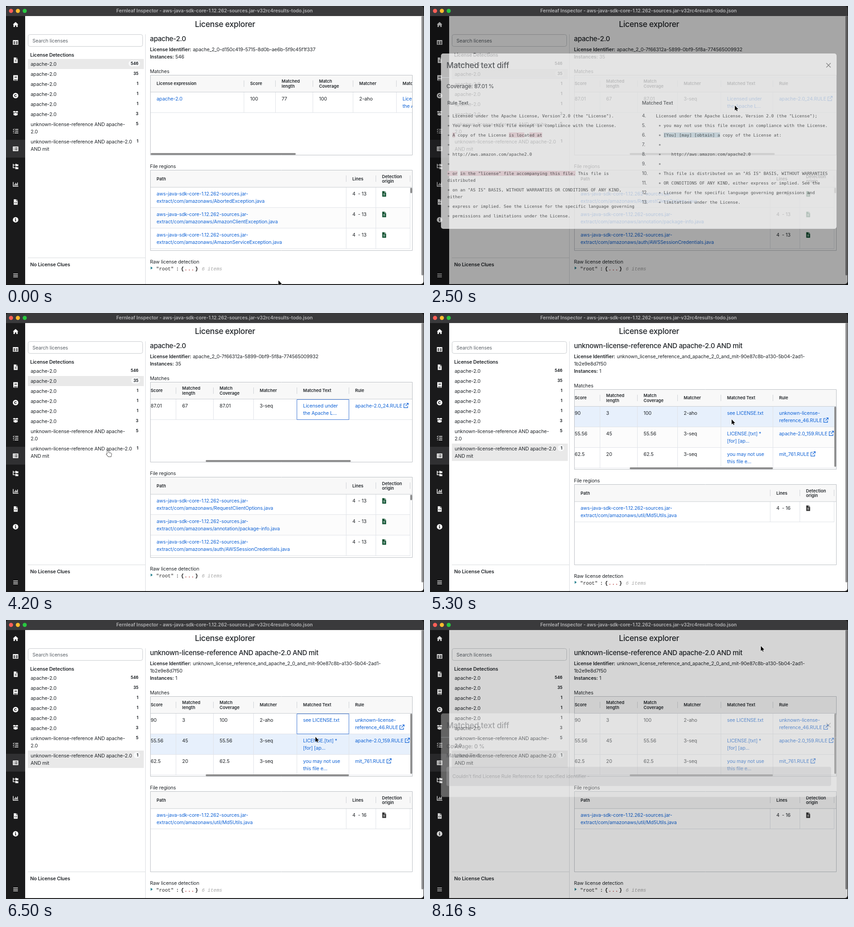
These frames come from a looping animation (916x611 px, 8320 ms). An HTML page with a canvas:

```html
<!DOCTYPE html>
<html lang="en">
<head>
<meta charset="utf-8">
<title>License explorer</title>
<style>
html, body { margin: 0; width: 100%; height: 100%; overflow: hidden; background: #1a1a1b; }
canvas { display: block; }
</style>
</head>
<body>
<canvas id="stage" width="916" height="611"></canvas>
<script>
const c = document.getElementById('stage').getContext('2d');
const LOOP = 8320, LINK = '#1264d6', INK = '#212529';
const SANS = 'Inter, sans-serif', CODE = '"DejaVu Sans Mono", monospace', MONO = '"Liberation Mono", monospace';

// ---------- data ----------
const detections = [
  ['apache-2.0', 546], ['apache-2.0', 35], ['apache-2.0', 1], ['apache-2.0', 1], ['apache-2.0', 1],
  ['apache-2.0', 3], ['unknown-license-reference AND apache-\n2.0', 5],
  ['unknown-license-reference AND apache-2.0\nAND mit', 1]
];
const jar = 'aws-java-sdk-core-1.12.262-sources.jar-\nextract/com/amazonaws/';
const apacheText = 'Licensed under\nthe Apache L...';
const licenses = [
  { item: 0, name: 'apache-2.0', id: 'apache_2_0-d150c419-5715-8d0b-ae6b-5f9c45f1f337', count: 546, dy: 0, end: 13,
    rows: [['apache-2.0', '100', '77', '100', '2-aho', apacheText, 'apache-2.0_7.RULE']],
    files: ['AbortedException', 'AmazonClientException', 'AmazonServiceException'] },
  { item: 1, name: 'apache-2.0', id: 'apache_2_0-7f66312a-5899-0bf9-5f8a-774565009932', count: 35, dy: 0, end: 13,
    rows: [['apache-2.0', '87.01', '67', '87.01', '3-seq', apacheText, 'apache-2.0_24.RULE']],
    files: ['RequestClientOptions', 'annotation/package-info', 'auth/AWSSessionCredentials'] },
  { item: 7, name: 'unknown-license-reference AND apache-2.0 AND mit',
    id: 'unknown_license_reference_and_apache_2_0_and_mit-90e87c8b-a130-5b04-2ad1-', id2: '1b2e9e8d7f50',
    count: 1, dy: 16, end: 16,
    rows: [
      ['unknown-license-reference', '90', '3', '100', '2-aho', 'see LICENSE.txt', 'unknown-license-\nreference_46.RULE'],
      ['apache-2.0', '55.56', '45', '55.56', '3-seq', 'LICENSE.[txt] *\n[for] [ap...', 'apache-2.0_159.RULE'],
      ['mit', '62.5', '20', '62.5', '3-seq', 'you may not use\nthis file e...', 'mit_761.RULE']],
    files: ['util/Md5Utils'] }
];
const columns = [['License expression', 330, 521], ['Score', 535, 590], ['Matched\nlength', 604, 672],
  ['Match\nCoverage', 686, 760], ['Matcher', 774, 855], ['Matched Text', 869, 969], ['Rule', 983, 1150]];

// Text between ~ marks is highlighted.
const modals = [
  { open: 2500, close: 3700, height: 384, coverage: '87.01',
    left: ['* Licensed under the Apache License, Version 2.0 (the "License").',
      '* You may not use this file except in compliance with the License.',
      '* ~A~ copy of the License ~is loc~at~ed at~', '*', '* http://aws.amazon.com/apache2.0', '*',
      '~* or~ ~in the "license" file accompanying this file.~ This file is\ndistributed',
      '* on an "AS IS" BASIS, WITHOUT WARRANTIES OR CONDITIONS OF ANY KIND,\neither',
      '* express or implied. See the License for the specific language governing',
      '* permissions and limitations under the License.'],
    right: [' Licensed under the Apache License, Version 2.0 (the "License");',
      '  * you may not use this file except in compliance with the License.',
      '  * ~[You] [may] [obtain] a~ copy of the License at:', '  *',
      '  *    http://aws.amazon.com/apache2.0', '  *',
      '  * This file is distributed on an "AS IS" BASIS, WITHOUT WARRANTIES',
      '  * OR CONDITIONS OF ANY KIND, either express or implied. See the',
      '  * License for the specific language governing permissions and',
      '  * limitations under the License.'] },
  { open: 5400, close: 5900, height: 165, coverage: '100', left: ['see LICENSE.txt'], right: ['see LICENSE.txt'] },
  { open: 6700, close: 8160, height: 375, coverage: '55.56',
    left: ['LICENSE.', '* Licensed under the Apache License, Version 2.0 (the "License").',
      '* You may not use this file except in compliance with the License.',
      '* A copy of the License is located at', '*', '* http://aws.amazon.com/apache2.0', '*',
      '* or in the "license" file accompanying this file. ~This file is~'],
    right: ['LICENSE.~[txt]~', '  * ~[for] [applicable] [license] [terms] [and] [NOTICE]~',
      '  * ~[for] [applicable] [notices]~', '  *',
      '  * Licensed under the Apache License, Version 2.0 (the "License").',
      '  * You may not use this file except in compliance with the License.',
      '  * A copy of the License is located at', '  *', '  * http://aws.amazon.com/apache2.0', '  *',
      '  * or in the "license" file accompanying this file.'] }
];
const cursorKeys = [[300, 597, 601], [800, 265, 150], [1100, 265, 150], [1500, 561, 260], [1600, 561, 260],
  [1900, 578, 243], [2300, 668, 218], [2900, 668, 218], [3500, 805, 73], [3700, 805, 73], [4200, 223, 301],
  [4600, 223, 301], [5300, 661, 233], [5500, 661, 233], [5800, 690, 185], [5900, 690, 185], [6400, 678, 256],
  [7100, 678, 256], [8000, 725, 57]];
const scrollKeys = [[1500, 0], [1600, 100], [1700, 168], [1800, 206], [1900, 218]];

// ---------- icons, 12 units square ----------
const page = 'M2 0H7V3.5H10.5V12H2ZM7.8 0L10.5 2.7H7.8Z';
const disc = 'M6 0A6 6 0 1 0 6 12A6 6 0 1 0 6 0Z';
const fileIcon = page + 'M4 5.5H8.5V6.5H4ZM4 8H8.5V9H4Z';
const icons = [
  'M6 0L12 5.5H10.5V11H7.5V7.5H4.5V11H1.5V5.5H0Z',
  'M0 1H12V11H0ZM1.5 4H5.2V6.2H1.5ZM6.8 4H10.5V6.2H6.8ZM1.5 7.5H5.2V9.5H1.5ZM6.8 7.5H10.5V9.5H6.8Z',
  fileIcon,
  'M1 0H11V9.5H10V11H11V12H2.5Q1 12 1 10.5ZM3.5 3H9V4H3.5ZM3.5 5H9V6H3.5ZM2.7 9.5H9V11H2.7Z',
  disc + 'M8.5 4.5A3 3 0 1 0 8.5 7.5L7.4 6.7A1.6 1.6 0 1 1 7.4 5.3Z',
  'M0 3L2 .5 6 1.5 10 .5 12 3 8 4.5 6 2.5 4 4.5ZM1.5 5L4 5.8 6 4 8 5.8 10.5 5V9.5L6 11 1.5 9.5Z',
  'M0 2.2L.7 1.5 1.5 2.3 3 .5 3.7 1.2 1.5 3.8ZM0 6.2L.7 5.5 1.5 6.3 3 4.5 3.7 5.2 1.5 7.8ZM5 1.5H12V3H5ZM5 5.3H12V6.8H5ZM4 9.2H12V10.7H4ZM.8 9.2H2.3V10.7H.8Z',
  'M0 1H12V11H0ZM1.7 3H3.2V4.2H1.7ZM4.5 3H10.3V4.2H4.5ZM1.7 5.4H3.2V6.6H1.7ZM4.5 5.4H10.3V6.6H4.5ZM1.7 7.8H3.2V9H1.7ZM4.5 7.8H10.3V9H4.5Z',
  'M0 0H1.5V2H5V3.3H1.5V8H5V9.3H0ZM5.5 0H8L8.7 1H12V5H5.5ZM5.5 6.5H8L8.7 7.5H12V11.5H5.5Z',
  'M0 1H1.4V9.6H12V11H0ZM3 6H4.4V8.6H3ZM5.2 3H6.6V8.6H5.2ZM7.4 4.5H8.8V8.6H7.4ZM9.6 2H11V8.6H9.6Z',
  page + 'M5.5 5.5L3.2 7.5 5.5 9.5V8.2L4.7 7.5 5.5 6.8ZM7 5.5L9.3 7.5 7 9.5V8.2L7.8 7.5 7 6.8Z',
  disc + 'M5 2.6H6.8V4.3H5ZM4.6 5.2H6.8V8.3H7.5V9.4H4.6V8.3H5.3V6.3H4.6Z',
  'M1 2H11V3.3H1ZM1 5.4H11V6.7H1ZM1 8.8H11V10.1H1Z'
].map(d => new Path2D(d));
const filePath = new Path2D(fileIcon);
const linkPath = new Path2D('M5 2H.7V10.3H9V6.5M6.5 .7H10.3V4.5M10.3 .7L4.5 6.5');
const arrow = new Path2D('M0 0V11L2.6 8.6 4.3 12.2 5.9 11.5 4.3 8H7.7Z');
const hand = new Path2D('M3 0Q4.5 0 4.5 1.5V5L10 6Q11.5 6.5 11.3 8L10 13.5H4.5L0 8.5Q0 7 1.8 7.6L2 8V1.5Q2 0 3 0Z');

// ---------- helpers ----------
function at(keys, t) {
  const i = keys.findIndex(k => k[0] > t);
  if (i < 0) return keys.at(-1).slice(1);
  if (!i) return keys[0].slice(1);
  const a = keys[i - 1], b = keys[i], u = (t - a[0]) / (b[0] - a[0]), e = u * u * (3 - 2 * u);
  return a.slice(1).map((v, j) => v + (b[j + 1] - v) * e);
}
function rect(x, y, w, h, fill, r = 0) {
  c.fillStyle = fill;
  c.beginPath(); c.roundRect(x, y, w, h, r); c.fill();
}
function frame(x, y, w, h, color, r = 0) {
  c.strokeStyle = color; c.lineWidth = 1;
  c.beginPath(); c.roundRect(x + .5, y + .5, w - 1, h - 1, r); c.stroke();
}
// y is the middle of the first line
function text(s, x, y, { size = 10.67, weight = 400, color = INK, font = SANS, align = 'left', lead = 16, track = -.011 } = {}) {
  c.font = `${weight} ${size}px ${font}`;
  c.letterSpacing = (font === SANS ? track * size : 0) + 'px';
  c.fillStyle = color; c.textAlign = align;
  s.split('\n').forEach((line, i) => c.fillText(line, x, y + size * .36 + i * lead));
}
function icon(path, x, y, color) {
  c.save(); c.translate(x, y); c.fillStyle = color; c.fill(path, 'evenodd'); c.restore();
}
function clip(x, y, w, h, draw) {
  c.save(); c.beginPath(); c.rect(x, y, w, h); c.clip(); draw(); c.restore();
}
function header(s, x, y) {
  const two = s.includes('\n');
  text(s, x, two ? y - 5 : y, { size: 9.4, weight: 600, lead: 10.5, track: 0 });
}

// ---------- parts ----------
function chrome() {
  rect(0, 0, 916, 611, '#1a1a1b');
  rect(0, 0, 915, 22, '#3a3a3c', [6, 6, 0, 0]);
  ['#ff5f57', '#febc2e', '#28c840'].forEach((k, i) => rect(6.5 + 15 * i, 6.3, 9, 9, k, 4.5));
  text('Fernleaf Inspector - aws-java-sdk-core-1.12.262-sources.jar-v32rc4results-todo.json', 457, 10.5,
    { size: 10.4, weight: 600, color: '#b4b4b6', align: 'center', track: 0 });
  rect(42, 22, 873, 587, '#fff', [0, 0, 6, 0]);
  rect(910.5, 22, 4, 568, '#858587', 2);
  rect(0, 293, 42, 39, '#303032');
  icons.forEach((p, i) => icon(p, 15, (i === 12 ? 590 : 41 + 38.83 * i) - 6, '#fff'));
}
function sidebar(lic) {
  text('License explorer', 480, 40, { size: 17.3, weight: 500, align: 'center', track: -.018 });
  frame(48, 62, 252, 27, '#c8cbce', 4);
  text('Search licenses', 58, 76, { color: '#5c6268' });
  text('License Detections', 53, 107, { weight: 600 });
  let y = 127;
  detections.forEach(([name, n], i) => {
    const h = name.includes('\n') ? 38 : 22;
    if (i === lic.item) {
      rect(48, y - 11, 254, h, '#e9e9e9');
      const w = 9 + 5.5 * String(n).length;
      rect(294 - w, y - 7.5, w, 13, '#f8f9fa', 6.5);
    }
    text(name, 54, y);
    text(String(n), 290, y - 1, { size: 8.7, weight: 700, align: 'right' });
    y += h;
  });
  rect(305, 62, 1, 547, '#d9dcdf');
  rect(48, 551, 257, 1, '#d9dcdf');
  text('No License Clues', 53, 566, { weight: 600 });
}
function matches(lic, scroll, hover, focus) {
  text('Matches', 315.5, 143);
  rect(316, 152, 575, 36, '#f8f8f8');
  clip(317, 152, 573, 174, () => {
    c.save(); c.translate(-scroll, 0);
    columns.forEach(([label, x, edge]) => {
      header(label, x, 170);
      rect(edge, 163, 1, 14, '#cfd2d6');
    });
    lic.rows.forEach((row, r) => {
      const y = 189 + 45 * r;
      rect(316, y, 1040, 44, r === hover ? '#e7f0fc' : r % 2 ? '#fcfcfc' : '#fff');
      rect(316, y + 44, 1040, 1, '#e0e3e8');
      columns.forEach(([, x, edge], i) => {
        const linked = i === 0 || i > 4;
        text(row[i], x, y + 14, { color: linked ? LINK : INK });
        rect(edge, y, 1, 44, '#e0e3e8');
        if (i !== 6) return;
        const lines = row[i].split('\n');
        c.save();
        c.translate(x + c.measureText(lines.at(-1)).width + 3, y + 8 + 16 * (lines.length - 1));
        c.strokeStyle = LINK; c.lineWidth = 1.2; c.stroke(linkPath);
        c.restore();
      });
    });
    if (focus) frame(855, 189, 115, 45, '#3f77d4');
    c.restore();
    const tall = lic.rows.length > 1;
    rect(317 + scroll * .553, 322, tall ? 314 : 318, 4, '#8e8e8e', 2);
    if (tall) rect(886, 189, 4, 132, '#8e8e8e', 2);
  });
  rect(316, 188, 575, 1, '#c9cdd2');
  frame(316, 151, 575, 176, '#bcc0c5');
}
function regions(lic) {
  text('File regions', 315.5, 351);
  rect(316, 360, 575, 37, '#f8f8f8');
  [['Path', 330, 745], ['Lines', 759, 810], ['Detection\norigin', 824, 885]].forEach(([label, x, edge]) => {
    header(label, x, 378.5);
    rect(edge, 371, 1, 14, '#cfd2d6');
  });
  clip(316, 397, 575, 138, () => lic.files.forEach((file, r) => {
    const y = 397 + 45 * r;
    if (r % 2) rect(317, y, 569, 44, '#fcfcfc');
    rect(316, y + 44, 570, 1, '#e0e3e8');
    [745, 810, 885].forEach(x => rect(x, y, 1, 44, '#e0e3e8'));
    text(jar + file + '.java', 330, y + 14, { color: LINK });
    text('4', 759, y + 14);
    text('- ' + lic.end, 771.5, y + 14);
    icon(filePath, 822.5, y + 8.5, lic.dy ? '#333' : '#0d5130');
  }));
  if (!lic.dy) rect(886, 398, 4, 12, '#8e8e8e', 2);
  rect(316, 396.5, 575, 1, '#c9cdd2');
  frame(316, 359, 575, 177, '#bcc0c5');
}
function raw() {
  const put = (s, x, color, weight = 400) => text(s, x, 575.5, { font: MONO, color, weight });
  text('Raw license detection', 315.5, 560);
  icon(new Path2D('M0 0L4.5 3.2 0 6.5Z'), 317, 570.5, '#2a8290');
  put('"root"', 329, '#222');
  put(':', 372.5, '#222', 700);
  put('{', 383.5, '#111', 700);
  [391, 398.5, 406].forEach(x => put('.', x, '#a22', 700));
  put('}', 414.5, '#111', 700);
  put('6 items', 429, '#a5a5a5', 'italic 400');
}
function details(lic, scroll, hover, focus) {
  text(lic.name, 315.5, 72, { size: 14.9, weight: 500, track: -.02 });
  text('License Identifier:', 315.5, 95, { weight: 600 });
  text(lic.id, 409.5, 95);
  if (lic.id2) text(lic.id2, 315.5, 111);
  c.save(); c.translate(0, lic.dy);
  text('Instances:', 315.5, 111, { weight: 600 });
  text(String(lic.count), 371, 111);
  matches(lic, scroll, hover, focus);
  regions(lic);
  raw();
  c.restore();
}
function codeLine(line, x, y, mark) {
  const unit = 5.617;
  let n = 0, row = 0, on = false;
  for (const piece of line.split(/(~|\n)/)) {
    if (piece === '~') on = !on;
    else if (piece === '\n') { n = 0; row++; }
    else {
      const px = x + n * unit, py = y + 15 * row;
      if (on) rect(px, py - 5.5, piece.length * unit, 11, mark);
      // the asterisk operator sits at mid height
      text(piece.replaceAll('*', '\u2217'), px, py, { size: 9.33, font: CODE, color: '#16181a' });
      n += piece.length;
    }
  }
  return y + 21 + 15 * row;
}
function modal(m, t, p) {
  const reset = t >= m.close, h = reset ? 183 : m.height;
  rect(0, 22, 915, 588, `rgba(0,0,0,${.5 * p})`);
  c.save();
  c.globalAlpha = p;
  c.translate(0, 314.5 - h / 2 - (p < 1 ? 18.5 : 0));
  rect(24, 0, 867, h, '#fff', 5);
  text('Matched text diff', 36, 26, { size: 17.3, weight: 500 });
  rect(24, 52, 867, 1, '#dee2e6');
  c.strokeStyle = '#555'; c.lineWidth = 1.2;
  c.stroke(new Path2D('M868.5 21L878 30.5M878 21L868.5 30.5'));
  text(`Coverage: ${reset ? 0 : m.coverage} %`, 36, 72, { size: 12, weight: 500 });
  if (reset) {
    text('Matched Text:', 36, 92, { size: 11.5, weight: 500 });
    rect(36, 117, 843, 42, '#b6b7b9', 4);
    text("Couldn't find License Rule Reference for specified identifier -", 49, 138, { color: '#55585c' });
  } else {
    text('Rule Text', 38, 108.5, { weight: 500 });
    text('Matched Text', 464.5, 108.5, { weight: 500 });
    let y = 136.5;
    for (const line of m.left) y = codeLine(line, 38, y, '#d3bbc1');
    m.right.forEach((line, i) => {
      text(`${i + 4}.`, 464.5, 136.5 + 21 * i, { size: 10 });
      codeLine(line, 489.5, 136.5 + 21 * i, '#b4c6cf');
    });
  }
  c.restore();
}
function pointer(x, y, isHand) {
  c.save();
  c.translate(isHand ? x - 3 : x, y);
  c.lineJoin = 'round';
  c.strokeStyle = isHand ? '#111' : '#fff';
  c.fillStyle = isHand ? '#fff' : '#000';
  c.lineWidth = 1.3;
  const shape = isHand ? hand : arrow;
  c.stroke(shape); c.fill(shape);
  c.restore();
}

// ---------- timeline ----------
const opacity = (m, t) => t < m.open ? 0
  : t < m.close ? Math.min(1, .7 + (t - m.open) / 300)
  : Math.max(0, .33 - (t - m.close) / 300);

function draw(t) {
  const lic = licenses[t < 1100 ? 0 : t < 4600 ? 1 : 2];
  const [x, y] = at(cursorKeys, t), [scroll] = at(scrollKeys, t);
  const shown = modals.find(m => opacity(m, t) > 0);
  const inGrid = !shown && x > 316 && x < 891 && y < 326 + lic.dy;
  const hover = inGrid ? Math.floor((y - 189 - lic.dy) / 45) : -1;
  const focus = !shown && (t >= 3700 && t < 4600 || t >= 5900);
  chrome();
  sidebar(lic);
  details(lic, scroll, hover, focus);
  if (shown) modal(shown, t, opacity(shown, t));
  pointer(x, y, !shown && x < 300);
}

// Motion advances in 100 ms ticks, with one late tick at the end.
const start = performance.now();
function tick() {
  const t = (performance.now() - start) % LOOP;
  draw(t >= 8160 ? 8160 : Math.floor(t / 100) * 100);
  requestAnimationFrame(tick);
}
tick();
</script>
</body>
</html>
```
